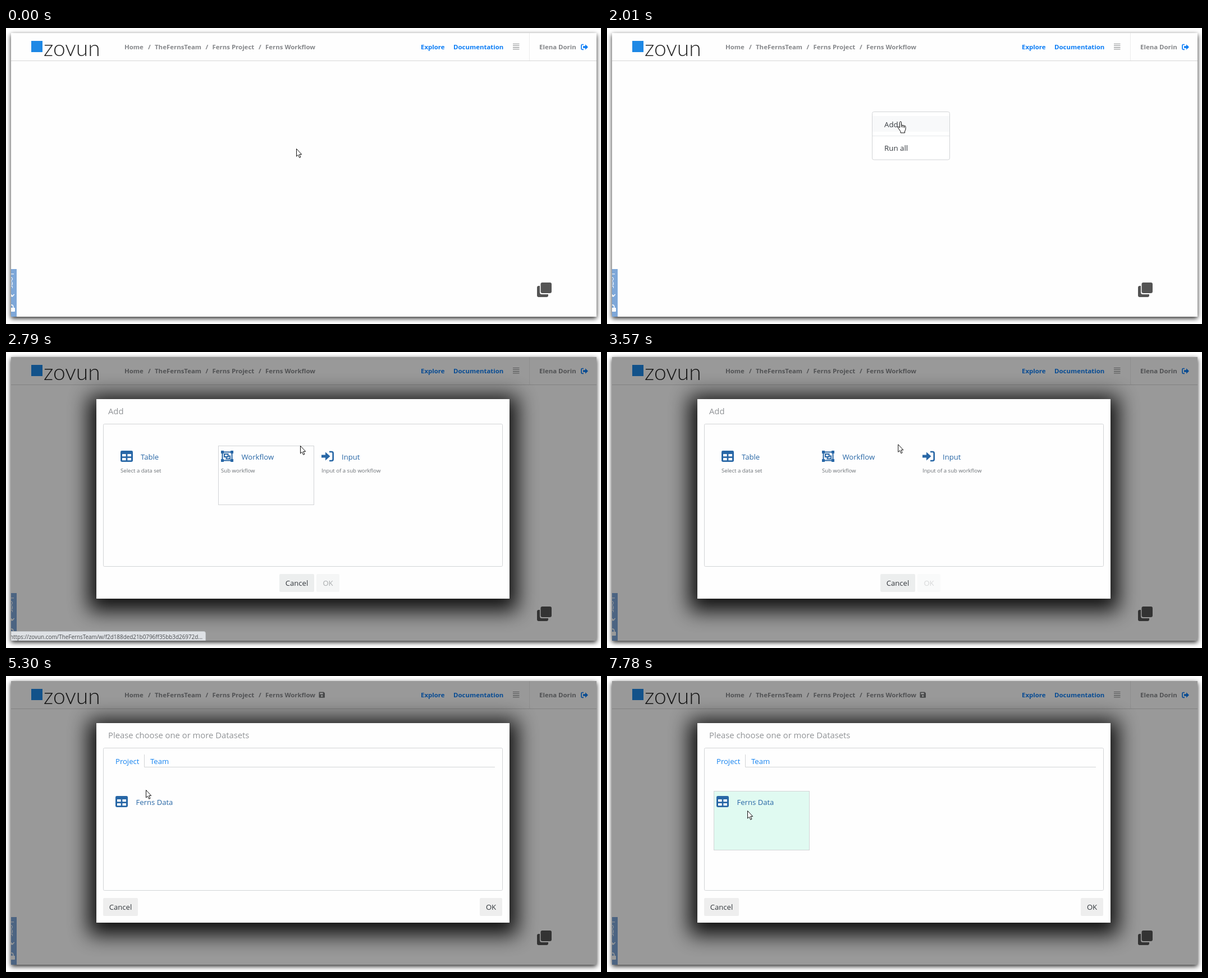
Animation of 1060x528 px, one loop 8000 ms. Source, as an HTML page:

```html
<!DOCTYPE html>
<html lang="en">
<head>
<meta charset="utf-8">
<title>Add a data set</title>
<style>
  html, body { margin: 0; width: 100%; height: 100%; overflow: hidden; background: #fff; }
  svg { display: block; width: 100vw; height: 100vh; }
  text { font-family: "Open Sans", "Noto Sans", sans-serif; font-size: 13.1px; fill: #33383d; white-space: pre; }
  .nav { font-size: 11.45px; font-weight: 700; fill: #85878a; }
  .nav.link { fill: #0a7cf5; }
  .brand { font-family: Lato, "Open Sans", sans-serif; font-size: 39px; font-weight: 300; fill: #222; }
  .title { font-size: 14.8px; fill: #909396; }
  .name { fill: #2867a6; }
  .note { font-size: 9.6px; fill: #6b7075; }
  .tab { fill: #1583f0; }
  .url { font-size: 9.9px; fill: #4a4d50; }
  .mid { text-anchor: middle; }
  .line { fill: none; stroke: #d2d4d6; }
</style>
</head>
<body>
<svg viewBox="0 0 1060 528" preserveAspectRatio="none">
  <defs>
    <filter id="soft" x="-10%" y="-10%" width="120%" height="120%"><feGaussianBlur stdDeviation="4.2"/></filter>
    <filter id="deep" x="-20%" y="-30%" width="140%" height="160%"><feGaussianBlur stdDeviation="18"/></filter>
    <clipPath id="page"><rect x="9" y="9" width="1043" height="506"/></clipPath>
    <g id="tableIcon">
      <rect width="22" height="20" rx="2.4" fill="#2867a6"/>
      <path d="M3 6h6.6v4.2H3zM12.4 6H19v4.2h-6.6zM3 13h6.6v4.2H3zM12.4 13H19v4.2h-6.6z" fill="#fff"/>
    </g>
  </defs>

  <rect width="1060" height="528" fill="#fff"/>
  <rect x="9" y="12" width="1043" height="506" fill="#000" opacity=".85" filter="url(#soft)"/>
  <rect x="9" y="9" width="1043" height="506" fill="#fefefe"/>

  <g clip-path="url(#page)">
    <!-- header -->
    <path d="M9 58.5H1052" stroke="#d6d6d6"/>
    <path d="M932.5 9V58" stroke="#ececec"/>
    <rect x="45" y="23" width="20" height="20" fill="#1e88e5"/>
    <text class="brand" x="67" y="50">zovun</text>
    <g id="crumbs"></g>
    <text class="nav link" x="739" y="38">Explore</text>
    <text class="nav link" x="797" y="38">Documentation</text>
    <path d="M903 28.5h11.5M903 31.5h11.5M903 34.8h11.5M903 38h11.5" stroke="#8a8c8e" stroke-width="1.2"/>
    <text class="nav" x="950" y="38">Elena Dorin</text>
    <path d="M1029 29.5h-2.4q-1.6 0-1.6 1.6v5.6q0 1.6 1.6 1.6h2.4" fill="none" stroke="#0a7cf5" stroke-width="1.7"/>
    <path d="M1028 32.3h4v-3l5 4.7-5 4.7v-3h-4z" fill="#0a7cf5"/>
    <g id="save">
      <path d="M558.5 28.5h7.5l2 2v7q0 1.2-1.2 1.2h-8q-1.3 0-1.3-1.2v-7.8q0-1.2 1-1.2z" fill="#77797b"/>
      <path d="M559.3 30h5.4v2.6h-5.4z" fill="#fff"/><circle cx="562.7" cy="35.6" r="1.6" fill="#fff"/>
    </g>

    <!-- log tab -->
    <rect x="9" y="430" width="10" height="85" fill="#7ea7d8"/>
    <text transform="translate(5 437) rotate(90)" style="font-size:13px;fill:#fff">Logs</text>
    <path d="M9 475.5l2.6 3 3-3.4M11.6 478.5H9" fill="none" stroke="#fff" stroke-width="1.5"/>
    <path d="M9 499h6q1 0 1 1v5q0 1-1 1H9z" fill="#fff"/>
    <path d="M9 494.2q3.8-.8 3.8 3.4V499" fill="none" stroke="#fff" stroke-width="1.6"/>

    <!-- stack button -->
    <path d="M949 460h2v11.5q0 3.5 3.5 3.5h11.500v2q0 3-3 3h-14q-3 0-3-3v-14q0-3 3-3z" fill="#545454"/>
    <rect x="952.500" y="454" width="19.500" height="19" rx="3" fill="#545454"/>

    <!-- context menu -->
    <g id="menu">
      <rect class="line" x="472.500" y="149.500" width="138" height="85.500" rx="3" style="fill:#fff"/>
      <rect id="row" x="473" y="157" width="137" height="28"/>
      <path d="M473 192.500h137" stroke="#e6e8ea"/>
      <text id="addText" x="494" y="176.500" style="font-size:13.300px">Add</text>
      <text x="494" y="219" style="font-size:13.300px">Run all</text>
    </g>

    <g id="dialog">
      <rect x="9" y="9" width="1043" height="506" opacity=".4"/>
      <rect x="147" y="78" width="764" height="384" opacity=".9" filter="url(#deep)"/>
      <rect x="161" y="84" width="736" height="356" fill="#fefefe"/>
      <rect class="line" x="173.500" y="128.500" width="711" height="254" rx="2"/>
      <text class="title" id="title" x="182" y="111"></text>
      <rect class="line" id="hover" width="170" height="105"/>

      <g id="kinds">
        <use href="#tableIcon" x="204" y="176"/>
        <text class="name" x="240" y="192">Table</text>
        <text class="note" x="204" y="214.500">Select a data set</text>

        <g fill="none" stroke="#2867a6" stroke-width="2">
          <path d="M385.500 178.500h17v15h-17z"/>
          <path d="M389 182h6.500v5H389zM395.500 185.500h3.500v5h-6.500V187"/>
        </g>
        <path d="M383 176h5v5h-5zM400 176h5v5h-5zM383 191h5v5h-5zM400 191h5v5h-5z" fill="#2867a6"/>
        <text class="name" x="419.500" y="192">Workflow</text>
        <text class="note" x="383" y="214.500">Sub workflow</text>

        <path d="M562 183.500h7v-5l8.500 7.500-8.500 7.500v-5h-7z" fill="#2867a6"/>
        <path d="M576 178h4q2.700 0 2.700 2.700v10.600q0 2.700-2.700 2.700h-4" fill="none" stroke="#2867a6" stroke-width="2.700"/>
        <text class="name" x="598" y="192">Input</text>
        <text class="note" x="562" y="214.500">Input of a sub workflow</text>

        <rect x="487" y="396" width="62" height="32" rx="2" fill="#eceeee"/>
        <text class="mid" x="518" y="417">Cancel</text>
        <g id="okOff">
          <rect x="553" y="396" width="41" height="32" rx="2" fill="#f5f6f6"/>
          <text class="mid" x="573.500" y="417" style="fill:#a9acae">OK</text>
        </g>
      </g>

      <g id="sets">
        <path class="line" d="M246.500 140v22.500H871"/>
        <text class="tab" x="195" y="157">Project</text>
        <text class="tab" x="257" y="157">Team</text>
        <use href="#tableIcon" x="195" y="214"/>
        <text class="name" x="231.500" y="230">Ferns Data</text>
        <rect x="173" y="396" width="62" height="32" rx="2" fill="#eee"/>
        <text class="mid" x="204" y="417">Cancel</text>
        <rect x="844" y="396" width="40" height="32" rx="2" fill="#eee"/>
        <text class="mid" x="864" y="417">OK</text>
      </g>
    </g>

    <!-- status bar -->
    <g id="status">
      <path d="M9 498.500h343.500q3 0 3 3V515H9z" fill="#dee1e5" stroke="#c4c7ca"/>
      <text class="url" x="7" y="511.500">https://zovun.com/TheFernsTeam/w/f2d188ded21b0796ff35bb3d26972d...</text>
    </g>
  </g>

  <circle id="halo" r="10.500" fill="#ff0" opacity=".47"/>
  <g id="cursor" fill="#fff" stroke="#111" stroke-linejoin="round">
    <path id="arrow" d="M.5.500V14l3-2.700 2.200 5 2.200-1-2.200-4.900h4z"/>
    <path id="hand" d="M-1.500 1.500Q-1.500 0 0 0T1.500 1.500V6.500Q3 5.500 4 7 5.500 6 6.500 7.500 9 7 9 9.500V13Q9 15 7.500 17V20H0V17.500L-4.500 11Q-6 8.500-3.500 9L-1.500 11zM1.500 6.500V10M4 7V10.500M6.500 7.500V11"/>
  </g>
</svg>
<script>
const LOOP = 8000;
const el = {};
document.querySelectorAll("[id]").forEach(node => el[node.id] = node);

const crumbs = [["Home", 211], ["/", 253], ["TheFernsTeam", 265], ["/", 355.5],
  ["Ferns Project", 367.5], ["/", 450], ["Ferns Workflow", 462]];
el.crumbs.innerHTML = crumbs.map(([label, x]) => `<text class="nav" x="${x}" y="38">${label}</text>`).join("");

// Each move: start time, step length, step count, bend point, end point.
const HOME = [517, 215];
const moves = [
  [80, 73, 4, [495, 182], [473, 149]],
  [1630, 76, 6, [498, 152], [523, 167]],
  [2090, 80, 1, [524, 167], [524, 167]],
  [3570, 78, 11, [400, 110], [248, 201]],
  [4430, 80, 1, [249, 203], [249, 203]],
  [6140, 80, 8, [262, 215], [268, 246]],
  [6760, 80, 3, [264, 246], [257, 243]],
  [7000, 80, 2, [253, 241], [250, 240]]
];
const clicks = [[850, 990], [2550, 2710], [4990, 5130], [7620, 7780]];
const cards = { table: [199.5, 167.5], workflow: [378.5, 167.5], data: [190.5, 205.5] };

const between = (t, a, b) => t >= a && t < b;
const show = (node, on) => node.style.display = on ? "" : "none";
const ease = s => s * s * (3 - 2 * s);
const bend = (a, b, c, s) => (1 - s) * (1 - s) * a + 2 * s * (1 - s) * b + s * s * c;

function cursorAt(t) {
  let from = HOME;
  for (const [start, step, count, via, to] of moves) {
    if (t < start) break;
    const s = ease(Math.min(count, Math.floor((t - start) / step) + 1) / count);
    const now = [0, 1].map(i => bend(from[i], via[i], to[i], s));
    if (s < 1) return now;
    from = to;
  }
  return from;
}

function statusAlpha(t) {
  if (!between(t, 2090, 3270)) return 0;
  if (t < 2170) return 0.6;
  return t < 3030 ? 1 : 0.75 - 0.25 * Math.floor((t - 3030) / 80);
}

function drawHover(names, [x, y], picked) {
  const inside = ([cx, cy]) => between(x, cx, cx + 170) && between(y, cy - 1, cy + 105);
  const name = names.find(n => inside(cards[n]));
  show(el.hover, name);
  if (!name) return;
  el.hover.setAttribute("x", cards[name][0]);
  el.hover.setAttribute("y", cards[name][1]);
  el.hover.style.fill = picked ? "#e0faf1" : "none";
}

function render(t) {
  const tip = cursorAt(t);
  const place = `translate(${tip[0]} ${tip[1]})`;
  const overAdd = between(t, 1630, 2790) && tip[1] >= 157;
  const pressed = t >= 2550;
  const choosing = t >= 5210;

  el.cursor.setAttribute("transform", place);
  el.halo.setAttribute("transform", place);
  show(el.halo, clicks.some(([a, b]) => between(t, a, b)));
  const pointing = overAdd && t < 2710;
  show(el.hand, pointing);
  show(el.arrow, !pointing);

  show(el.menu, between(t, 920, 2790));
  el.row.style.fill = pressed ? "#007bff" : overAdd ? "#f8f9fa" : "none";
  el.addText.style.fill = pressed ? "#fff" : "";

  show(el.dialog, t >= 2790);
  show(el.kinds, !choosing);
  show(el.sets, choosing);
  el.title.textContent = choosing ? "Please choose one or more Datasets" : "Add";
  el.okOff.style.opacity = t < 2870 ? 1 : 0.45;
  drawHover(choosing ? ["data"] : ["table", "workflow"], tip, t >= 7780);

  show(el.save, t >= 5300);
  el.status.style.opacity = statusAlpha(t);
}

const begin = performance.now();
function tick() {
  render((performance.now() - begin) % LOOP);
  requestAnimationFrame(tick);
}
render(0);
requestAnimationFrame(tick);
</script>
</body>
</html>
```
